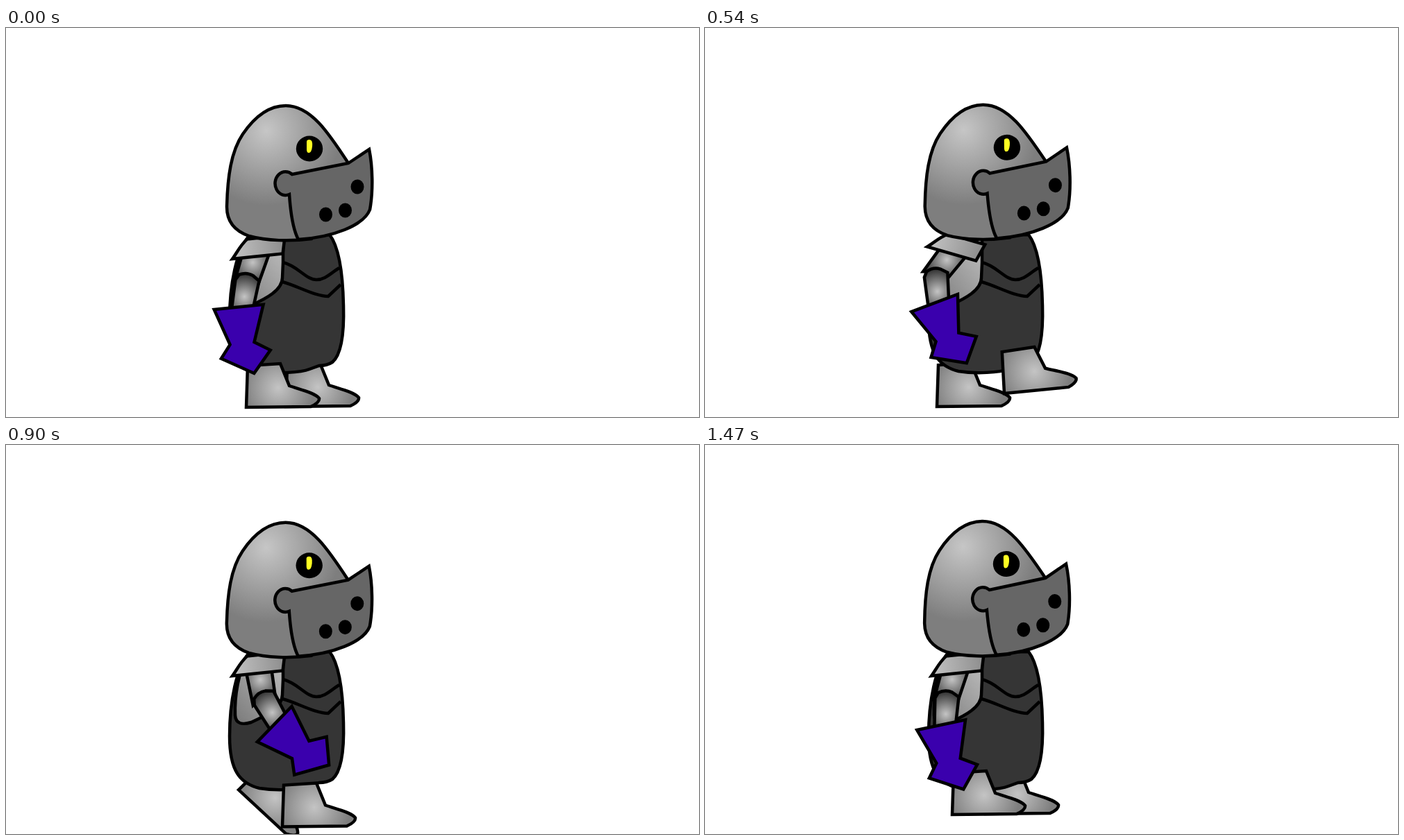
These frames come from a looping animation (998 px wide and 561 px high, 1.65 s). An HTML page:

```html
<!DOCTYPE html>
<html lang="en">
<head>
<meta charset="utf-8">
<title>Walking knight</title>
<style>
  html, body { margin: 0; width: 100%; height: 100%; overflow: hidden; background: #fff; }
  svg { display: block; width: 100%; height: 100%; }
  .line { stroke: #000; stroke-width: 4.5; }
</style>
</head>
<body>
<svg viewBox="0 0 998 561">
  <defs>
    <radialGradient id="helmFill" gradientUnits="userSpaceOnUse" cx="375" cy="148" r="108">
      <stop stop-color="#c6c6c6"/><stop offset="1" stop-color="#7e7e7e"/>
    </radialGradient>
    <radialGradient id="footFill" gradientUnits="userSpaceOnUse" cx="46" cy="-28" r="52">
      <stop stop-color="#c4c4c4"/><stop offset="1" stop-color="#7e7e7e"/>
    </radialGradient>
    <radialGradient id="upperFill" gradientUnits="userSpaceOnUse" cx="0" cy="23" r="34">
      <stop stop-color="#c4c4c4"/><stop offset="1" stop-color="#333"/>
    </radialGradient>
    <radialGradient id="lowerFill" gradientUnits="userSpaceOnUse" cx="0" cy="25" r="32">
      <stop stop-color="#c4c4c4"/><stop offset="1" stop-color="#333"/>
    </radialGradient>
    <linearGradient id="plateFill" x1="1" y1="0" x2="0.2" y2="1">
      <stop stop-color="#c2c2c2"/><stop offset="1" stop-color="#808080"/>
    </linearGradient>
    <linearGradient id="padFill">
      <stop stop-color="#c4c4c4"/><stop offset="1" stop-color="#8c8c8c"/>
    </linearGradient>
    <path id="foot" class="line" fill="url(#footFill)"
      d="M0 0L2-60L49-63L62-31C76-26 99-21 105-13Q106-7 93-1Z"/>
  </defs>

  <use id="farFoot" href="#foot"/>
  <g class="line" fill="#353535">
    <path d="M350 300C332 320 322 370 322 420C322 470 337 488 365 495C390 499 425 497 437 492L451 487Q462 487 470 482C484 470 487 435 486 400C485 350 479 315 466 298Z"/>
    <path fill="url(#plateFill)" d="M350 300C334 325 329 365 330 390C331 402 340 404 353 400C375 390 398 378 398 360L399 338V300Z"/>
    <path fill="none" d="M399 338C420 343 432 363 447 363C460 363 468 353 480 346M398 366C420 372 445 387 464 387L482 370"/>
  </g>
  <use id="nearFoot" href="#foot"/>
  <path id="upperArm" class="line" fill="url(#upperFill)" d="M-18 4L-17 57Q0 44 17 48L19 4Z"/>
  <g id="pad">
    <path class="line" fill="url(#padFill)" transform="translate(326 333) rotate(-6)"
      d="M0 0C8-9 14-19 24-26H79L73 0Z"/>
  </g>
  <g id="lowerArm" class="line">
    <path fill="url(#lowerFill)" d="M-17 3L-13-5Q-3-11 7-7L17-1L15 45H-15Z"/>
    <path fill="#3a00ad" transform="translate(-5 41) rotate(-11)"
      d="M-36 3L35-3L21 51L44 63L20 96L-27 74L-14 54Z"/>
  </g>
  <g id="head">
    <path class="line" fill="url(#helmFill)"
      d="M403 112C377 112 356 131 341 153C324 178 319 215 318 258C318 280 330 293 350 300C375 307 410 308 440 304L493 195C465 152 439 112 403 112Z"/>
    <path class="line" fill="#666"
      d="M412 211L493 195L523 175C528 200 529 235 524 262C515 285 470 302 421 305C414 292 410 270 408 240A15 17 0 1 1 412 211Z"/>
    <ellipse cx="437" cy="174" rx="19.2" ry="18.5"/>
    <path fill="#ff2" d="M433 164Q433 161 437 161Q442 161 441 171Q440 180 436 180Q433 180 433 175Z"/>
    <g id="holes">
      <ellipse cx="506" cy="229" rx="9.5" ry="10.5"/>
      <ellipse cx="488.5" cy="263" rx="9.5" ry="10.5"/>
      <ellipse cx="460.5" cy="269" rx="9.5" ry="10.5"/>
    </g>
  </g>
</svg>
<script>
const STEP = 30, LAST = 1470, LOOP = 1650;

// Key poses of the walk: stand, stride, pass, reach, stride, pass, reach, stand
const beats = [0, 180, 360, 540, 780, 1020, 1230, LAST];
const walk = {
  nearX:    [346, 283, 344, 431, 415, 381, 309, 356],
  nearTilt: [0, 42, 37, -5, 0, 0, 27, 0],
  farX:     [403, 446, 397, 334, 300, 370, 447, 404],
  farTilt:  [0, -6, 0, 0, 42, 45, -18, 0],
  ground:   [547, 547, 547, 547, 547, 554, 547, 533],
  pad:      [0, 0, 0, 22, 14, -14, 0, 0],
  shoulder: [17, 21, 26, 37, 9, -30, 16, 16],
  elbow:    [10, -10, -31, -5, -29, -31, 4, 4],
  nod:      [0, 0.5, 1, 0.7, 0, 0.2, 0.8, 1],
};

function poseAt(t) {
  const i = Math.max(1, beats.findIndex(beat => beat >= t));
  const k = (t - beats[i - 1]) / (beats[i] - beats[i - 1]);
  const pose = {};
  for (const name in walk) pose[name] = walk[name][i - 1] * (1 - k) + walk[name][i] * k;
  return pose;
}

const place = (id, transform) => document.getElementById(id).setAttribute("transform", transform);

// A heel rolls up over the toe; a foot with its toe raised swings clear of the ground
function placeFoot(id, x, tilt, ground) {
  const lift = tilt > 0 ? tilt * 1.2 : Math.min(20, -4 * tilt);
  place(id, `translate(${x} ${ground - lift}) rotate(${tilt})`);
}

function draw(now) {
  const p = poseAt(Math.min(LAST, Math.floor(now % LOOP / STEP) * STEP));
  placeFoot("nearFoot", p.nearX, p.nearTilt, p.ground);
  placeFoot("farFoot", p.farX, p.farTilt, p.ground - 1);
  const upper = `translate(362 316) rotate(${p.shoulder})`;
  place("upperArm", upper);
  place("lowerArm", `${upper} translate(0 49) rotate(${p.elbow - p.shoulder})`);
  place("pad", `rotate(${p.pad} 368 309)`);
  place("head", `translate(${-1.2 * p.nod} ${-2.2 * p.nod}) rotate(${-0.8 * p.nod} 421 305)`);
  requestAnimationFrame(draw);
}
draw(0);
</script>
</body>
</html>
```
